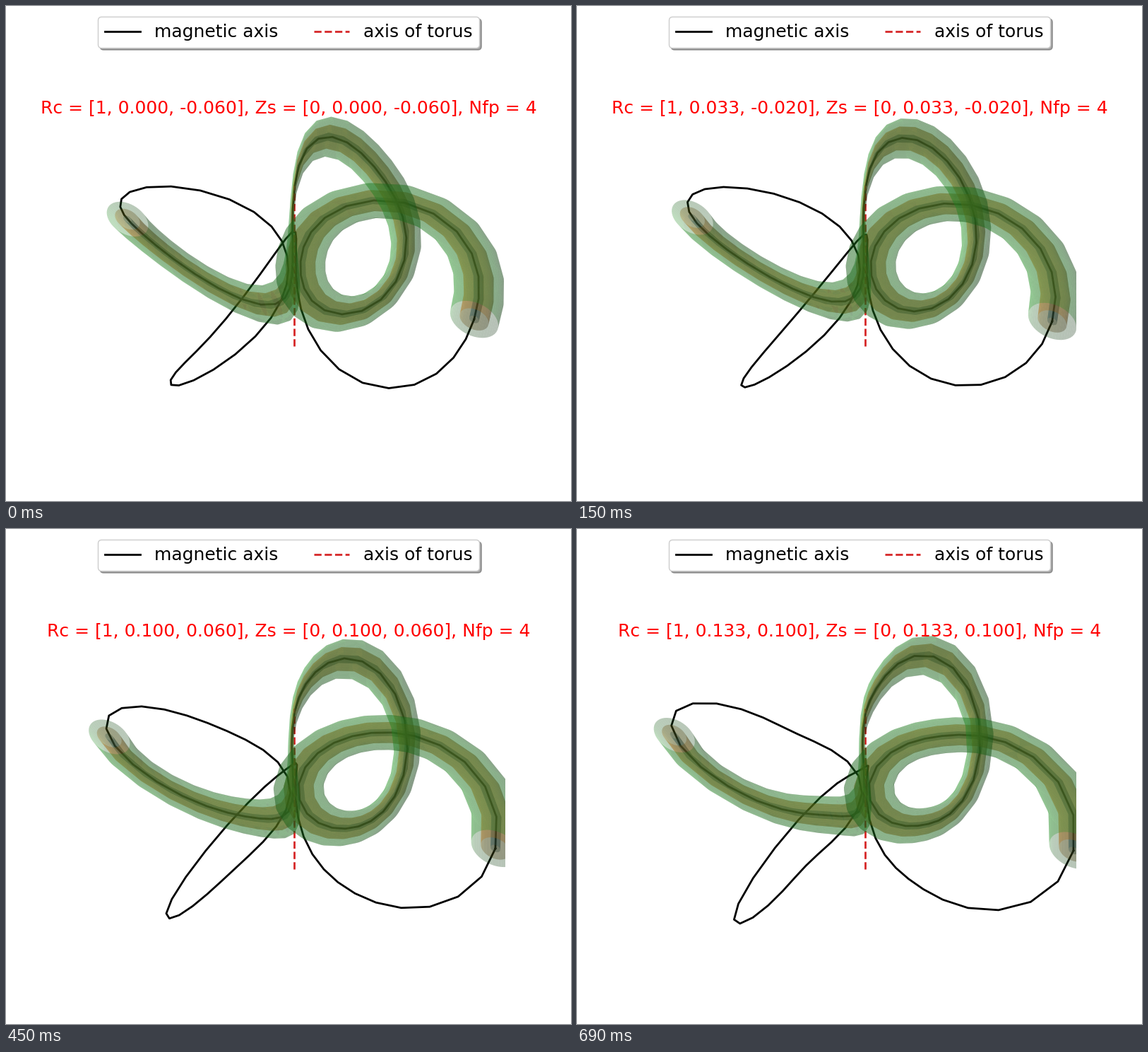
A matplotlib script for the animation above (0.75 s loop, 800 px wide and 700 px high).

```python
import numpy as np
import matplotlib.pyplot as plt
from matplotlib.animation import FuncAnimation

W, H = 800, 700
FRAMES, INTERVAL = 5, 150
NFP = 4
LIM = 1.3
TUBES = [(0.05, "C0"), (0.15, "C1"), (0.25, "C2")]

plt.rcParams.update({"font.family": "DejaVu Sans", "font.size": 18})


def axis_rz(phi, a, b):
    """Cylindrical R and Z of the magnetic axis."""
    t = NFP * phi
    r = 1 + np.cos(t) + a * np.cos(2 * t) + b * np.cos(3 * t)
    z = np.sin(t) + a * np.sin(2 * t) + b * np.sin(3 * t)
    return r, z


def to_xyz(r, phi, z):
    return r * np.cos(phi), r * np.sin(phi), z


fig = plt.figure(figsize=(W / 100, H / 100), dpi=100, facecolor="white")
ax = fig.add_axes([93 / W, 15 / H, 614 / W, 614 / H], projection="3d")
ax.set_box_aspect((4, 4, 3), zoom=0.96)
ax.view_init(elev=30, azim=-60)
ax.set(xlim=(-LIM, LIM), ylim=(-LIM, LIM), zlim=(-LIM, LIM))
ax.set_axis_off()

curve, = ax.plot([], [], [], color="black", lw=2, label="magnetic axis")
torus, = ax.plot([0, 0], [0, 0], [-1.2, 1.2], color="tab:red", lw=2,
                 ls="--", label="axis of torus")
title = fig.text(0.5, 1 - 152 / H, "", color="red", ha="center",
                 va="baseline")
fig.legend(handles=[curve, torus], loc="upper center", ncol=2, shadow=True,
           fancybox=True, borderaxespad=0,
           bbox_to_anchor=(400.4 / W, 1 - 15.3 / H))

phi_line = np.linspace(0, 2 * np.pi, 100)
phi, theta = np.meshgrid(np.linspace(0, np.pi, 50),
                         np.linspace(0, 2 * np.pi, 50))
surfaces = []


def draw(i):
    a = i / 30
    b = -0.06 + 0.04 * i

    r, z = axis_rz(phi_line, a, b)
    curve.set_data_3d(*to_xyz(r, phi_line, z))

    while surfaces:
        surfaces.pop().remove()
    r, z = axis_rz(phi, a, b)
    for radius, color in TUBES:
        xyz = to_xyz(r + radius * np.cos(theta), phi,
                     z + radius * np.sin(theta))
        surfaces.append(ax.plot_surface(*xyz, color=color, alpha=0.3,
                                        linewidth=0))

    coefs = f"{a:.3f}, {b:.3f}"
    title.set_text(f"Rc = [1, {coefs}], Zs = [0, {coefs}], Nfp = {NFP}")
    return [curve, title, *surfaces]


anim = FuncAnimation(fig, draw, frames=FRAMES, interval=INTERVAL,
                     repeat=True, repeat_delay=0)
plt.show()
```
